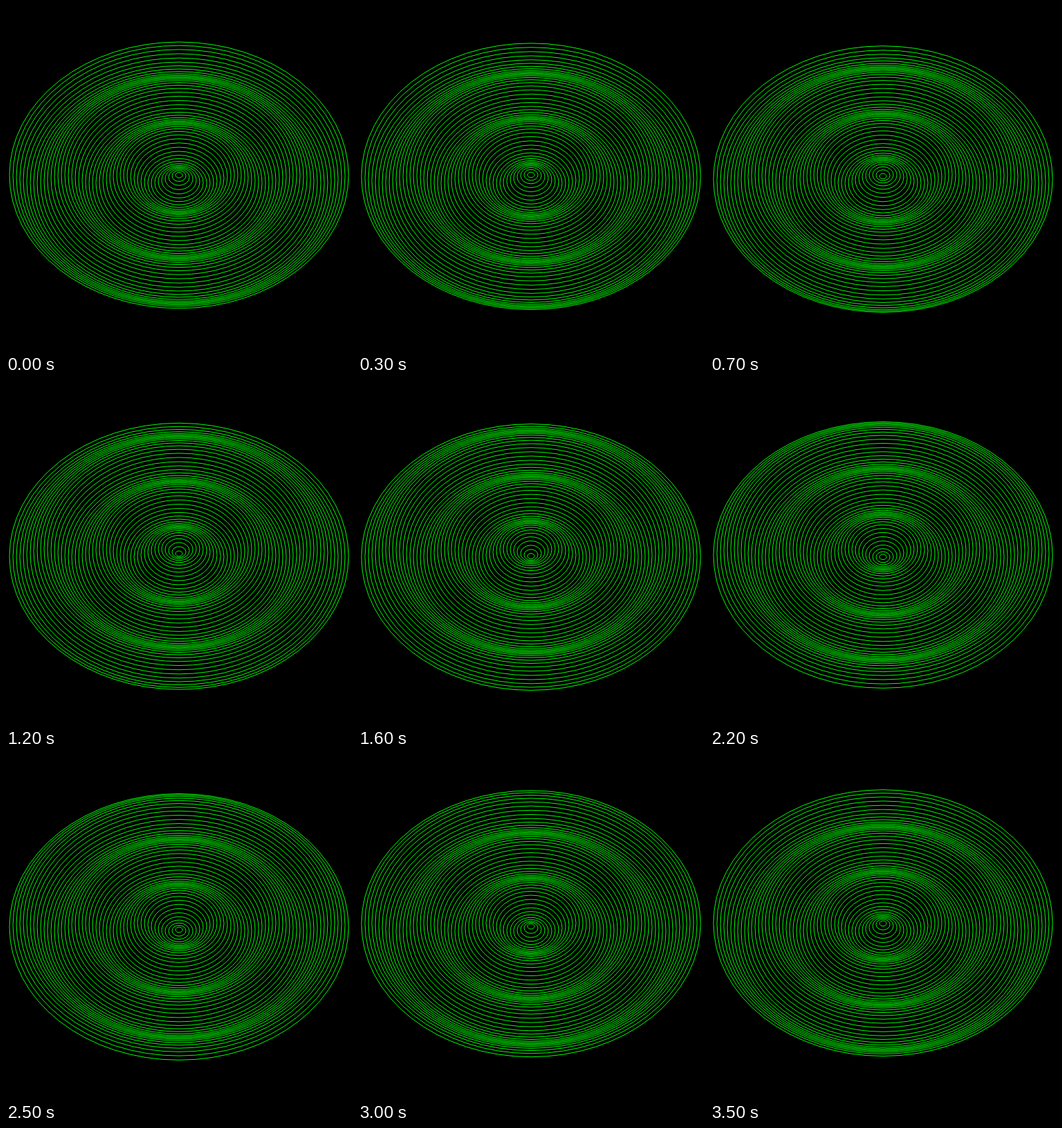
Animation of 500 by 500 pixels, one loop 3.6 s. Source, as an HTML page with a canvas:

```html
<!DOCTYPE html>
<html>
<head>
<meta charset="utf-8">
<title>Ripple</title>
<style>
html, body { margin: 0; height: 100%; overflow: hidden; background: #000; }
canvas { display: block; }
</style>
</head>
<body>
<canvas id="stage" width="500" height="500"></canvas>
<script>
const ctx = document.getElementById('stage').getContext('2d');
const STEPS = 36, STEP_MS = 100, RINGS = 49;
const TAU = 2 * Math.PI;
ctx.strokeStyle = '#0f0';
ctx.lineWidth = 1;

// Each ring bobs vertically; the phase lag makes the wave travel outwards.
function draw(step) {
  ctx.clearRect(0, 0, 500, 500);
  for (let k = 1; k <= RINGS; k++) {
    const y = 250 - 6 * Math.cos(TAU * (step / STEPS - 3 * k / 50));
    const r = 5 * k;
    ctx.beginPath();
    ctx.ellipse(250, y, r, r * Math.PI / 4, 0, 0, TAU);
    ctx.stroke();
  }
}

const start = performance.now();
function tick() {
  const elapsed = performance.now() - start;
  draw(Math.floor(elapsed / STEP_MS) % STEPS);
  requestAnimationFrame(tick);
}
tick();
</script>
</body>
</html>
```
